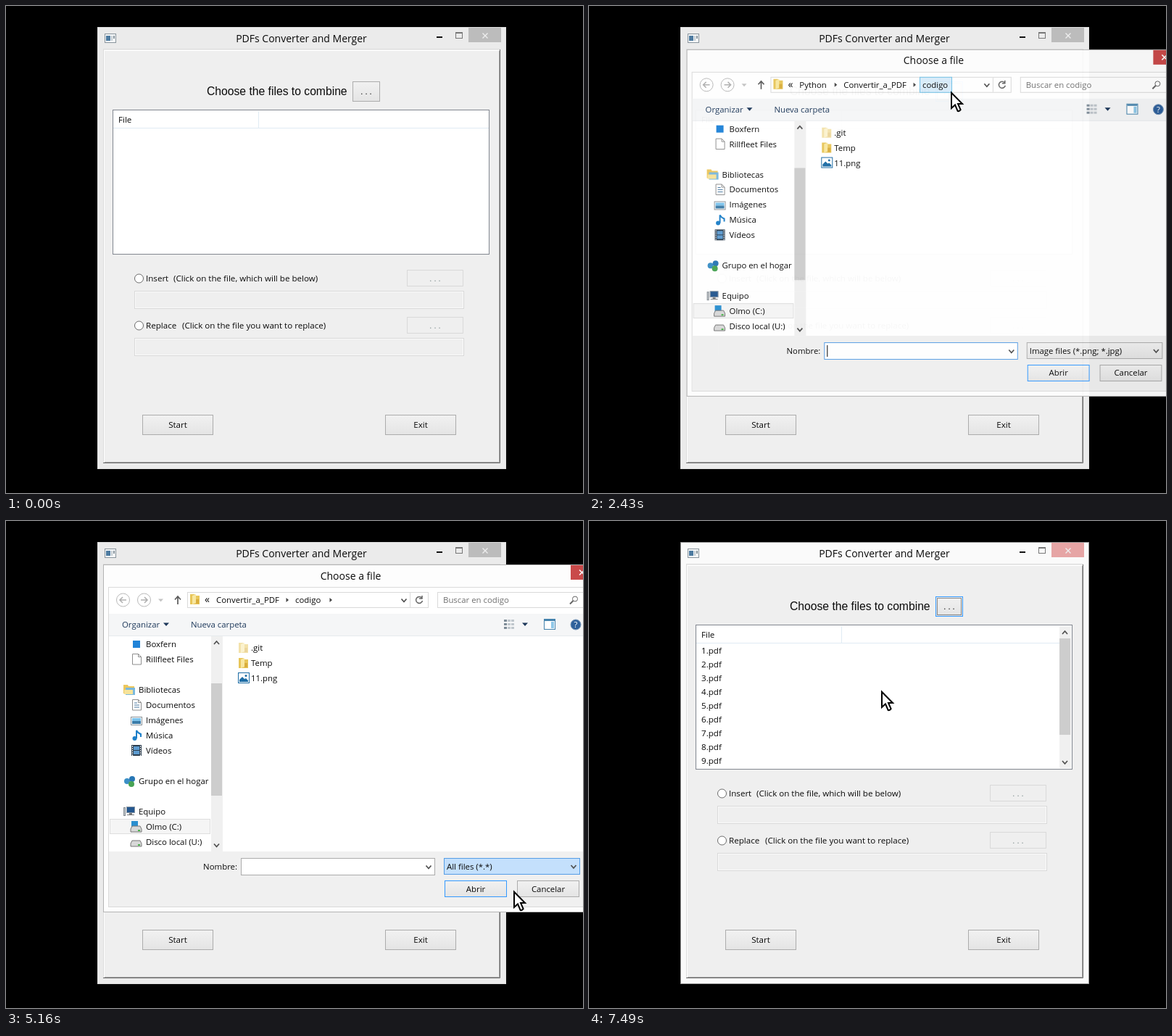
An HTML page for the animation above (8000 ms loop, 796 by 672 pixels).

```html
<!DOCTYPE html>
<html lang="en">
<head>
<meta charset="utf-8">
<title>PDFs Converter and Merger</title>
<style>
html, body { margin: 0; width: 100%; height: 100%; overflow: hidden; background: #000; }
svg { display: block; }
text { font: 11.6px "Open Sans", "Noto Sans", sans-serif; fill: #0a0a0a; white-space: pre; }
.dialog text { font-size: 11.4px; }
text.title, .dialog text.title { font-size: 14px; }
.head { font: 15.7px "Liberation Sans", Arial, sans-serif; }
.mid { text-anchor: middle; }
.end { text-anchor: end; }
.dim { fill: #707070; }
.off { fill: #7c8c8c; }
.navy { fill: #1e395b; }
.inv { fill: #fff; }
</style>
</head>
<body>
<svg id="stage" width="796" height="672" viewBox="0 0 796 672">
  <defs>
    <linearGradient id="face" x2="0" y2="1"><stop stop-color="#f1f1f1"/><stop offset="1" stop-color="#e4e4e4"/></linearGradient>
    <linearGradient id="hot" x2="0" y2="1"><stop stop-color="#ecf4fc"/><stop offset="1" stop-color="#dcecfc"/></linearGradient>
  </defs>
  <g id="scene"></g>
</svg>
<script>
const LOOP = 8000, TICK = 80;
const scene = document.getElementById('scene');

// Drawing helpers; each returns markup
const rect = (x, y, w, h, fill, stroke) => stroke
  ? `<rect x="${x + .5}" y="${y + .5}" width="${w - 1}" height="${h - 1}" fill="${fill}" stroke="${stroke}"/>`
  : `<rect x="${x}" y="${y}" width="${w}" height="${h}" fill="${fill}"/>`;
const path = (d, stroke, width = 1, fill = 'none') =>
  `<path d="${d}" stroke="${stroke}" stroke-width="${width}" fill="${fill}"/>`;
const disc = (x, y, r, fill, stroke = 'none') =>
  `<circle cx="${x}" cy="${y}" r="${r}" fill="${fill}" stroke="${stroke}"/>`;
const text = (x, y, s, cls = '') => `<text x="${x}" y="${y + 4}" class="${cls}">${s}</text>`;
const group = (attrs, body) => `<g ${attrs}>${body}</g>`;
const chevron = (x, y, up = 1) => path(`M${x - 3.5} ${y - 2 * up}l3.5 ${4 * up} 3.5 ${-4 * up}`, '#505050', 1.7);
const down = (x, y) => path(`M${x - 4} ${y - 2}h8l-4 4.5z`, 'none', 0, '#1e395b');
const right = (x, y) => path(`M${x - 1.5} ${y - 3}l3.5 3 -3.5 3z`, 'none', 0, '#444');

const looks = {
  plain: ['url(#face)', '#acacac'],
  hot: ['url(#hot)', '#7eb4ea'],
  down: ['#c4e0fc', '#569de5'],
  main: ['url(#face)', '#3399ff'],
  off: ['#efefef', '#d9d9d9']
};
const button = (x, y, w, h, s, look = 'plain') =>
  rect(x, y, w, h, ...looks[look]) + text(x + w / 2, y + h / 2, s, 'mid' + (look === 'off' ? ' off' : ''));

const appIcon = (x, y) => rect(x, y, 16, 13, '#f6f8f9', '#89949c') + rect(x + 2, y + 3, 6, 7, '#4d7ba0') +
  rect(x + 9, y + 3, 2, 7, '#c3ccd2') + rect(x + 12, y + 3, 2, 4, '#8a979f');
const folder = (x, y, a = 1) => group(`opacity="${a}"`,
  path(`M${x} ${y + 1}h6l2 2h5v12h-13z`, 'none', 0, '#e8c65a') +
  path(`M${x + 3} ${y + 3}l5 -2v12l-5 2z`, 'none', 0, '#f8e7a0') + rect(x + 8, y + 8, 4, 6, '#d9ad3c'));
const page = (x, y) => path(`M${x + .5} ${y + .5}h8l4 4v10.5h-12z`, '#8e8e8e', 1, '#fff') +
  path(`M${x + 8.5} ${y + .5}v4h4`, '#8e8e8e');
const picture = (x, y) => rect(x, y, 16, 15, '#fff', '#1c6ca5') +
  path(`M${x + 2} ${y + 13}v-3l4 -4 3 3 2 -1 3 3v2z`, 'none', 0, '#1c6ca5') + disc(x + 11, y + 4.5, 1.5, '#1c6ca5');
const landscape = (x, y) => rect(x, y, 16, 12, '#fff', '#8b9399') + rect(x + 2, y + 2, 12, 4, '#7cc3ec') + rect(x + 2, y + 6, 12, 4, '#3c7ca8');
const drive = (x, y) => path(`M${x + 2} ${y}h11l2 4v4h-15v-4z`, '#777', 1, '#d8d8d8') + rect(x + 10, y + 5, 3, 2, '#4ab34a');
const screen = (x, y) => rect(x + 4, y, 12, 9, '#24578f', '#8b98a5') + rect(x + 8, y + 9, 4, 2, '#777') +
  rect(x + 5, y + 11, 10, 1, '#777') + rect(x, y + 1, 3, 12, '#c9ced3', '#858c92');

// Pointer path: time, x, y
const route = [
  [530, 684, 655], [840, 525, 380], [1070, 525, 380], [1770, 500, 118], [2700, 499, 118],
  [3040, 590, 309], [3210, 590, 309], [3970, 694, 469], [4500, 694, 469], [4990, 700, 510],
  [5930, 700, 510], [6310, 447, 218], [6730, 403, 245], [6800, 403, 240], [6880, 403, 234]
];
function pointerAt(t) {
  const i = route.findLastIndex(k => k[0] <= t);
  if (i < 0) return null;
  const [a, x, y] = route[i], next = route[i + 1];
  if (!next) return { x, y };
  const p = Math.floor((t - a) / TICK) * TICK / (next[0] - a), e = p * p * (3 - 2 * p);
  return { x: Math.round(x + (next[1] - x) * e), y: Math.round(y + (next[2] - y) * e) };
}
const pointer = ({ x, y }) => group(`transform="translate(${x} ${y})"`,
  path('M1 1.8V23L6 18.4 9.6 27Q12 27.6 13.6 25.2L10 17H16Z', '#000', 2, '#fff'));

// Value of the last [time, value] pair reached
const stepped = (t, steps) => steps.findLast(s => s[0] <= t)[1];
const isHung = t => t >= 4200 && t < 4430;
const HUNG_RED = '#e02828';

function mainWindow(t, at) {
  const hung = isHung(t), filled = t >= 7240;
  const pressed = t >= 1950 && t < 2090, awake = pressed || t >= 7490;
  const over = at && at.x >= 478 && at.x < 516 && at.y >= 104 && at.y < 132;
  const look = pressed ? 'down' : t >= 2090 ? 'main' : over ? 'hot' : 'plain';
  const shut = hung ? HUNG_RED : awake ? '#e6a5a5' : '#bcbcbc';
  const edge = filled ? 649 : 666;
  let s = rect(126, 29, 564, 610, awake ? '#fafafa' : '#ebebeb', awake ? '#999' : '#e0e0e0') +
    appIcon(136, 38) + text(407.5, 45.5, 'PDFs Converter and Merger', 'mid title') +
    rect(594, 42, 8, 2, '#111') + rect(620, 36, 10, 9, 'none', '#777') + rect(620, 36, 10, 2, '#777') +
    rect(638, 30, 45, 20, shut) + path('M657.5 37.5l7 7m0 -7l-7 7', hung ? '#fff' : '#eee', 1.4) +
    rect(134, 59, 548, 572, '#efefef', '#dcdcdc') +
    path('M135.5 629V61.5H680', '#fff') + path('M134 630.5H681.5V60', '#696969') + path('M136 629.5H680.5V62', '#a5a5a5') +
    text(277, 118.5, 'Choose the files to combine', 'head') +
    button(478, 104, 38, 28, '. . .', look) +
    rect(147, 143, 520, 200, '#fff', '#828790') + rect(148, 168, edge - 148, 1, '#e0ebf4') + rect(348, 145, 1, 23, '#e0ebf4') +
    text(155, 157, 'File');
  if (look === 'main') s += `<rect x="480.5" y="106.5" width="33" height="23" fill="none" stroke="#222" stroke-dasharray="1 1"/>`;
  if (filled) {
    for (let i = 0; i < 9; i++) s += text(155, 179 + 19 * i, `${i + 1}.pdf`);
    s += rect(649, 145, 16, 196, '#f0f0f0') + rect(649, 162, 15, 133, '#cdcdcd') + chevron(656.5, 154, -1) + chevron(656.5, 333);
  }
  [['Insert', '(Click on the file, which will be below)', 231], ['Replace', '(Click on the file you want to replace)', 243]]
    .forEach(([name, hint, x], i) => {
      const y = 376 + 65 * i;
      s += disc(183.5, y, 6, '#fff', '#6a6a6a') + text(193, y, name) + text(x, y, hint) +
        button(553, y - 12, 78, 23, '. . .', 'off') +
        rect(177, y + 17, 455, 25, '#fafafa', '#d9d9d9') + rect(179, y + 19, 451, 21, '#efefef');
    });
  s += button(188, 564, 98, 28, 'Start') + button(523, 564, 98, 28, 'Exit');
  return group(hung ? 'transform="translate(5 5)"' : '', s);
}

function addressBar(t) {
  let s = disc(161.5, 109, 9, '#fff', '#b9b9b9') + path('M166 109h-9m4 -4l-4 4 4 4', '#b0b0b0', 1.6) +
    disc(190.5, 109, 9, '#fff', '#b9b9b9') + path('M186 109h9m-4 -4l4 4 -4 4', '#b0b0b0', 1.6) +
    path('M210 107.5h7l-3.5 4z', 'none', 0, '#c4c4c4') + path('M237 115v-11m-4 4.5l4 -4.5 4 4.5', '#5a5a5a', 1.7) +
    rect(250, 98, 333, 22, '#fff', '#d9d9d9') + rect(557, 99, 1, 20, '#d9d9d9') + folder(254, 100) +
    text(274, 109, '«', 'title') + chevron(549, 109.5) +
    path('M573.5 106a4.5 4.5 0 1 0 1 4M574 103v4h-4', '#666', 1.5) +
    rect(595, 98, 230, 22, '#fff', '#d9d9d9') + text(603, 109, 'Buscar en codigo', 'dim') +
    disc(785, 107.5, 3.5, 'none', '#666') + path('M782.5 110l-4.5 4.5', '#666', 2);
  if (t < 2650) s += rect(456, 98, 45, 22, '#d9ecfa', '#70c0e7') + text(290, 109, 'Python') + right(340, 109) +
    text(351, 109, 'Convertir_a_PDF') + right(449, 109) + text(460, 109, 'codigo');
  else s += text(290, 109, 'Convertir_a_PDF') + right(388, 109) + text(399, 109, 'codigo') + right(448, 109);
  return s;
}

function toolbar() {
  let s = rect(142, 128, 670, 30, '#f5f6f7') + rect(142, 158, 670, 1, '#e6eaed') + text(160, 143, 'Organizar', 'navy') + down(221, 142.5) +
    text(255, 143, 'Nueva carpeta', 'navy') + down(716, 142.5) +
    rect(742, 135, 16, 15, '#fff', '#4583ad') + rect(743, 136, 14, 2, '#4583ad') + rect(752, 139, 4, 9, '#8fc8e8') +
    disc(786, 143, 7, '#2f619b', '#7896b8') + text(786, 143, '?', 'mid inv');
  for (let i = 0; i < 9; i++) s += rect(687 + i % 3 * 5, 136 + (i / 3 | 0) * 5, 4, 3, i % 3 ? '#c0c7cd' : '#7e8c98');
  return s;
}

function sidebar() {
  const rows = [[193, 170, 'Boxfern'], [193, 191, 'Rillfleet Files'], [183, 233, 'Bibliotecas'], [193, 254, 'Documentos'],
    [193, 275, 'Imágenes'], [193, 296, 'Música'], [193, 317, 'Vídeos'], [183, 359, 'Grupo en el hogar'],
    [183, 401, 'Equipo'], [193, 422, 'Olmo (C:)'], [193, 443, 'Disco local (U:)']];
  let film = rect(173, 309, 14, 15, '#2b3d4e') + rect(176, 311, 8, 5, '#5d9bd0') + rect(176, 317, 8, 5, '#5d9bd0');
  for (let y = 310; y < 323; y += 3) film += rect(174, y, 1, 2, '#fff') + rect(185, y, 1, 2, '#fff');
  return rect(143, 411, 139, 21, '#f5f5f5', '#dedede') +
    rows.map(r => text(...r)).join('') +
    rect(175, 165, 10, 10, '#2083d8') + page(174, 183) +
    path('M162 226h6l1 2h8v10h-15z', 'none', 0, '#ecc75d') + rect(165, 230, 13, 10, '#79b8dd') + rect(163, 233, 12, 6, '#f6e39a') +
    page(174, 246) + path('M177 251h4m-4 3h7m-7 3h7', '#4c7aa2') + landscape(172, 270) +
    path('M180 300v-11q2 4 6 5v4', '#1d7fc8', 2) + disc(177.5, 300, 3, '#1d7fc8') + film +
    disc(167, 359, 4, '#3b8fc6') + disc(174, 356, 4, '#2877b5') + disc(173, 363, 4, '#48a354') +
    screen(162, 394) + rect(173, 414, 9, 9, '#2a8fd0') + drive(172, 421) + drive(172, 441) +
    rect(283, 159, 16, 297, '#f0f0f0') + rect(283, 224, 15, 155, '#cdcdcd') + chevron(290.5, 168, -1) + chevron(290.5, 447.5);
}

function files(t, at) {
  const all = t >= 5300, picked = t >= 6880;
  let s = '';
  if (picked) s += rect(316, 228, 120, 21, '#d1e8ff', '#66a7e8');
  else if (all && at.x < 436 && at.y >= 228 && at.y < 249) s += rect(316, 228, 120, 21, '#e5f3fb', '#70c0e7');
  s += folder(321, 167, .5) + folder(321, 188) + picture(320, 209);
  const names = ['.git', 'Temp', '11.png'];
  if (all) {
    names.push('Actualizacion.pdf', 'main.py', 'README.md');
    s += rect(322, 231, 12, 14, '#d9472b') + rect(321, 252, 14, 14, '#474747') + page(322, 272) +
      path('M328.5 277v6m-3 -3l3 3 3 -3', '#4f9a66', 1.4);
  }
  return s + names.map((n, i) => text(338, 175 + 21 * i, n)).join('');
}

function dropList(h, low) {
  return group('opacity=".4"', rect(607, 491, 188, h, '#000')) +
    `<svg x="604" y="488" width="188" height="${h}">` +
    group(`transform="translate(0 ${h - 32})"`, rect(0, 0, 188, 32, '#fff', '#555') +
      rect(1, low ? 16 : 1, 186, 15, '#3399ff') +
      text(4, 8, 'Image files (*.png; *.jpg)', low ? '' : 'inv') + text(4, 24, 'All files (*.*)', low ? 'inv' : '')) +
    '</svg>';
}

function footer(t, at) {
  const over = at.x >= 604 && at.y >= 465 && at.y < 488;
  const combo = stepped(t, [[0, over ? 'hot' : 'plain'], [4050, 'hot'], [5160, 'down'], [5240, 'hot'], [5380, 'plain']]);
  const caret = t < 4050 && Math.floor((t - 2300) / 530) % 2 === 0;
  return rect(142, 456, 670, 76, '#f0f0f0') + text(319, 477, 'Nombre:', 'end') +
    rect(324, 465, 268, 24, '#fff', t < 4300 ? '#569de5' : '#ababab') + chevron(583, 477.5) +
    (caret ? rect(328, 469, 1, 16, '#000') : '') + (t >= 7020 ? text(328, 477, 'Actualizacion.pdf') : '') +
    rect(604, 465, 188, 23, ...looks[combo]) +
    text(608, 477, t < 5160 ? 'Image files (*.png; *.jpg)' : 'All files (*.*)') + chevron(783, 477) +
    button(605, 496, 86, 23, 'Abrir', 'main') + button(705, 496, 86, 23, 'Cancelar') +
    (t >= 4200 && t < 5160 ? dropList(t < 4270 ? 9 : 32, at.y >= 504) : '');
}

function dialog(t, at) {
  const [alpha, scale] = stepped(t, [[0, [0, 1]], [2300, [.35, .99]], [2370, [.75, .995]], [2430, [.97, .998]], [2490, [1, 1]],
    [7240, [.6, .995]], [7320, [.2, .99]], [7400, [0, 1]]]);
  if (!alpha) return '';
  const hung = isHung(t);
  return group(`class="dialog" opacity="${alpha}" transform="translate(476 0) scale(${scale}) translate(-476 0)"`,
    rect(134, 60, 684, 480, '#fdfdfd', '#b4b4b4') + (hung ? appIcon(144, 69) : '') +
    text(475.5, 76.5, hung ? 'Choose a file (No responde)' : 'Choose a file', 'mid title') +
    rect(779, 61, 45, 20, hung ? HUNG_RED : '#c94a4a') + path('M791 67.5l7 7m0 -7l-7 7', '#fff', 1.5) +
    rect(141, 91, 671, 442, '#fff', '#dadada') +
    addressBar(t) + toolbar() + sidebar() + files(t, at) + footer(t, at));
}

let shown = '';
function draw(now) {
  const t = now % LOOP, at = pointerAt(t);
  const markup = mainWindow(t, at) + (at ? dialog(t, at) + pointer(at) : '');
  if (markup !== shown) scene.innerHTML = shown = markup;
}
const start = performance.now();
function frame() {
  draw(performance.now() - start);
  requestAnimationFrame(frame);
}
frame();
</script>
</body>
</html>
```
